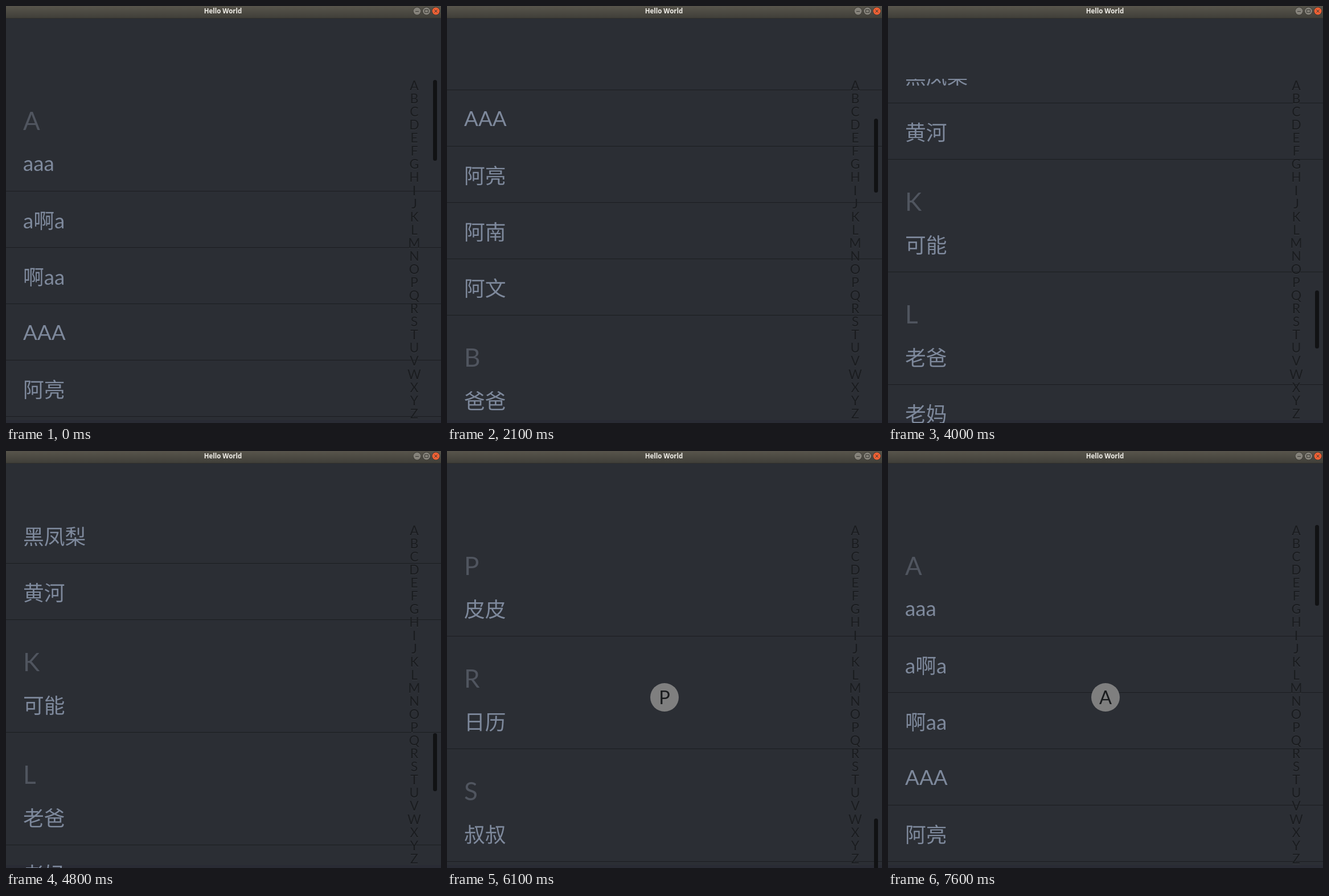
Animation, 764 px wide and 733 px high, one loop 8 s. Source, as an HTML page with a canvas:

```html
<!DOCTYPE html>
<html lang="zh">
<head>
<meta charset="utf-8">
<title>Hello World</title>
<style>
html, body { margin: 0; width: 100%; height: 100%; overflow: hidden; background: #2b2e34; }
canvas { display: block; }
</style>
</head>
<body>
<canvas id="stage" width="764" height="733"></canvas>
<script>
const ctx = document.getElementById('stage').getContext('2d');
const FONT = 'Lato, "Noto Sans CJK SC", "Noto Sans CJK", sans-serif';
const ROW = 98.9, TOP = 127.3, VIEW_TOP = 128, WIDTH = 764, HEIGHT = 733;
const LETTERS = 'ABCDEFGHIJKLMNOPQRSTUVWXYZ';

const sections = {
  A: 'aaa a啊a 啊aa AAA 阿亮 阿南 阿文', B: '爸爸 宝贝', C: '昌源', D: '大哥',
  G: '哥哥', H: '黑凤梨 黄河', K: '可能', L: '老爸 老妈', M: '妈妈', P: '皮皮',
  R: '日历', S: '叔叔', W: '外婆', Y: '爷爷', Z: '芝麻'
};
const rows = [], start = {};
for (const key in sections) {
  start[key] = rows.length;
  rows.push({ text: key, head: true });
  for (const text of sections[key].split(' ')) rows.push({ text });
}
const maxScroll = rows.length * ROW - (HEIGHT - VIEW_TOP);

// time -> scroll offset while flicking
const flick = [[1300, 0], [2100, 375.5], [2900, 765.5], [4000, 1836], [4400, 2050], [4800, 1809], [5000, 1720]];
// scroll offset -> scroll bar top and height
const barTop = [[0, 130], [375, 198], [765, 272], [1809, 496], [1836, 500], [2670, 646]];
const barSize = [[0, 142], [375, 130], [765, 114], [1809, 102]];

function lerp(points, x) {
  if (x <= points[0][0]) return points[0][1];
  for (let i = 1; i < points.length; i++) {
    const [x0, y0] = points[i - 1], [x1, y1] = points[i];
    if (x <= x1) return y0 + (y1 - y0) * (x - x0) / (x1 - x0);
  }
  return points[points.length - 1][1];
}

function text(str, x, y, size, color, align = 'left') {
  ctx.font = size + 'px ' + FONT;
  ctx.textAlign = align;
  ctx.fillStyle = color;
  ctx.fillText(str, x, y);
}

function disc(x, y, r, color) {
  ctx.fillStyle = color;
  ctx.beginPath();
  ctx.arc(x, y, r, 0, Math.PI * 2);
  ctx.fill();
}

function titleBar() {
  const shade = ctx.createLinearGradient(0, 0, 0, 21);
  shade.addColorStop(0, '#58554c');
  shade.addColorStop(1, '#403f39');
  ctx.fillStyle = shade;
  ctx.fillRect(0, 0, WIDTH, 21);
  ctx.fillStyle = '#302f2c';
  ctx.fillRect(0, 21, WIDTH, 1);
  ctx.font = 'bold 11.5px "Open Sans", "Noto Sans", sans-serif';
  ctx.textAlign = 'center';
  ctx.fillStyle = '#f0eee8';
  ctx.fillText('Hello World', 381, 13);
  [722, 738.5, 755].forEach((x, i) => {
    disc(x, 9, 7.2, '#35342f');
    disc(x, 9, 6.5, i < 2 ? '#85827a' : '#ee6034');
    ctx.strokeStyle = '#3a3934';
    ctx.lineWidth = 1;
    ctx.beginPath();
    if (i === 0) { ctx.moveTo(x - 3, 9.5); ctx.lineTo(x + 3, 9.5); }
    if (i === 1) ctx.rect(x - 3, 6.5, 6, 5);
    if (i === 2) {
      ctx.moveTo(x - 2.5, 6.5); ctx.lineTo(x + 2.5, 11.5);
      ctx.moveTo(x + 2.5, 6.5); ctx.lineTo(x - 2.5, 11.5);
    }
    ctx.stroke();
  });
}

function list(scroll) {
  ctx.save();
  ctx.beginPath();
  ctx.rect(0, VIEW_TOP, WIDTH, HEIGHT - VIEW_TOP);
  ctx.clip();
  rows.forEach((row, i) => {
    const bottom = Math.round(TOP + (i + 1) * ROW - scroll);
    if (bottom < VIEW_TOP - 5 || bottom > HEIGHT + ROW) return;
    if (row.head) return text(row.text, 30, bottom - 8, 44, '#50555f');
    const baseline = bottom - (/^\w+$/.test(row.text) ? 35 : 33);
    text(row.text, 30, baseline, 36.8, '#7e899c');
    ctx.fillStyle = '#1b1d20';
    ctx.fillRect(0, bottom, WIDTH, 1);
  });
  ctx.restore();
}

function index() {
  [...LETTERS].forEach((letter, i) => {
    const y = 148 + i * 23.07;
    text(letter, 717, y + 1, 23, '#373a40', 'center');
    text(letter, 717, y, 23, '#1a1c1f', 'center');
  });
}

function scrollBar(scroll) {
  ctx.fillStyle = '#111214';
  ctx.beginPath();
  ctx.roundRect(750, lerp(barTop, scroll), 7, lerp(barSize, scroll), 3.5);
  ctx.fill();
}

// The pointer runs up the index from Z to A, one letter per tick, with one rest
function pickedLetter(t) {
  const step = (t - 5000) / 100 - (t >= 5900 ? 1 : 0);
  return 25 - Math.min(25, step);
}

function sectionScroll(picked) {
  let i = picked;
  while (i < 25 && !(LETTERS[i] in start)) i++;
  return Math.min(maxScroll, start[LETTERS[i]] * ROW);
}

function draw(now) {
  const t = Math.floor(now % 8000 / 100) * 100;
  const picking = t >= 5000;
  const picked = pickedLetter(t);
  const scroll = picking ? sectionScroll(picked) : lerp(flick, t);
  ctx.fillStyle = '#2b2e34';
  ctx.fillRect(0, 0, WIDTH, HEIGHT);
  ctx.fillStyle = '#292b34';
  ctx.fillRect(0, 728, WIDTH, 5);
  titleBar();
  list(scroll);
  index();
  scrollBar(scroll);
  if (picking) {
    disc(382, 433, 25, '#7f7f7f');
    text(LETTERS[picked], 382, 445, 32.5, '#191b1d', 'center');
  }
}

const begin = performance.now();
function loop() {
  draw(performance.now() - begin);
  requestAnimationFrame(loop);
}
loop();
</script>
</body>
</html>
```
